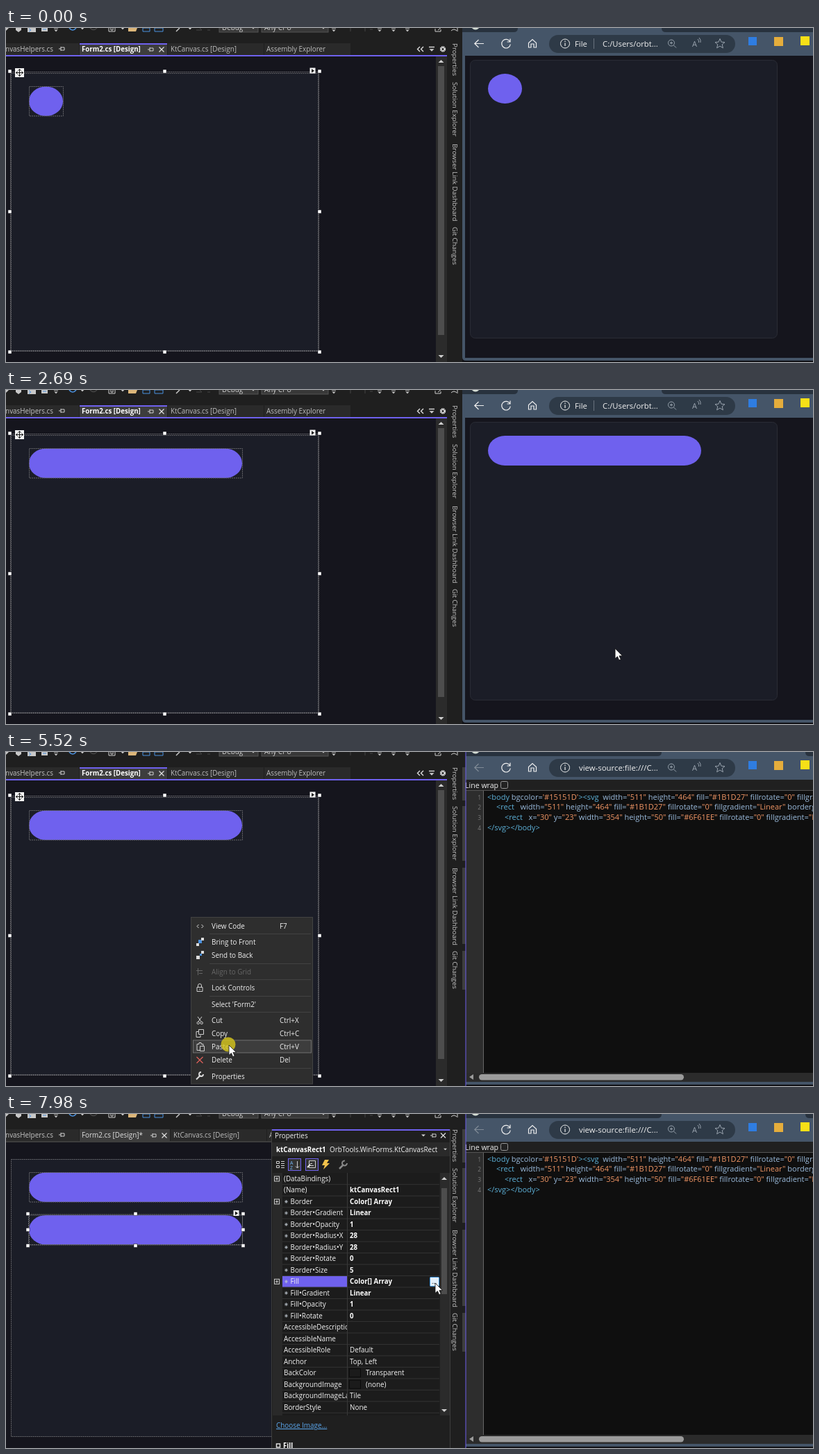
An HTML page that plays this animation: 1162 px wide and 482 px high, repeating every 8 s.

```html
<!DOCTYPE html>
<html lang="en">
<head>
<meta charset="utf-8">
<title>Form designer and browser</title>
<style>
html, body { margin: 0; width: 100%; height: 100%; overflow: hidden; background: #15151d; }
svg { display: block; width: 100%; height: 100%; }
text { font-family: "Open Sans", "Noto Sans", sans-serif; white-space: pre; }
</style>
</head>
<body>
<svg id="stage" viewBox="0 0 1162 482" xmlns="http://www.w3.org/2000/svg"></svg>
<script>
const LOOP = 8000, PURPLE = '#6f61ee', BAR = '#1f1f1f', BLUE = '#455568';
const stage = document.getElementById('stage');

const esc = s => s.replace(/&/g, '&amp;').replace(/</g, '&lt;').replace(/>/g, '&gt;');
const rect = (x, y, w, h, fill, more = '') =>
  `<rect x="${x}" y="${y}" width="${w}" height="${h}" fill="${fill}" ${more}/>`;
const line = (d, color = '#d0d0d0', w = 1, more = '') =>
  `<path d="${d}" fill="none" stroke="${color}" stroke-width="${w}" ${more}/>`;
const fill = (d, color = '#d0d0d0') => `<path d="${d}" fill="${color}"/>`;
const text = (x, y, s, color = '#d0d0d0', size = 9.9, more = '') =>
  `<text x="${x}" y="${y}" fill="${color}" font-size="${size}" ${more}>${esc(s)}</text>`;
const bold = (x, y, s, color = '#fff', size = 9.7, more = '') => text(x, y, s, color, size, `font-weight="700" ${more}`);
const group = (id, body, more = '') => `<g id="${id}" ${more}>${body}</g>`;
const dashed = (x, y, w, h, color = '#66666b', more = '') =>
  rect(x, y, w, h, 'none', `stroke="${color}" stroke-dasharray="2 1" ${more}`);
const pin = (x, y) => line(`M${x - 4} ${y}h3m0-3v6m0-5h5v4h-5`);
const cross = (x, y, r = 3.5, color = '#e0e0e0', w = 1.2) =>
  line(`M${x - r} ${y - r}l${2 * r} ${2 * r}m0 ${-2 * r}l${-2 * r} ${2 * r}`, color, w);
const caret = (x, y, r = 3.5, dir = 1) => fill(`M${x - r} ${y - dir * r / 2}h${2 * r}l${-r} ${dir * r}z`);

function pill(id, x, y) {
  return group(id,
    rect(x, y, 307, 42.5, PURPLE, 'rx="24.3" ry="21.2" class="shape"') +
    dashed(x + .5, y, 307, 42.5, '#66666b', 'class="shape"'));
}

// Dashed frame, eight handles and the small action button.
function selection(x, y, w, h) {
  let s = dashed(x + 1, y + 1, w - 2, h - 2, '#6c6c72');
  for (const i of [0, .5, 1]) for (const j of [0, .5, 1]) {
    if (i === .5 && j === .5) continue;
    s += rect(x + w * i - 2.5, y + h * j - 2.5, 5, 5, '#fff', 'stroke="#15151d" stroke-width=".5"');
  }
  return s + rect(x + w - 14, y - 5, 8, 8, '#f2f2f2') + fill(`M${x + w - 11.5} ${y - 3.5}l4 2.7l-4 2.7z`, '#111');
}

function toolbar() {
  let s = rect(0, 0, 662, 22, BAR);
  s += fill('M0 0h4l-4 4zM14 0h8v3l-4 3l-4-3zM31 0h12v6h-12zM51 0h9v5h-9z', '#c8c8c8');
  s += line('M33 1l3 2l-3 2M53 2h5M197 0h10v5h-10zM214 0h12v5h-12z', '#4b92e0');
  s += line('M91 0q5 6 10 0', '#4b92e0', 1.6) + line('M121 0q5 5 10 0', '#484848', 1.2);
  s += line('M148 0v5h9v-5M151 0v3h3v-3') + fill('M176 0h13l-2 5h-11z', '#dcb67a');
  s += line('M250 0l-5 5', '#c8c8c8', 1.5) + line('M274 3h8l-3-3M290 3h4', '#444');
  for (const x of [72, 472, 538, 558, 578]) s += line(`M${x - 3} 1h6`, '#aaa') + caret(x, 4, 2.5);
  for (const x of [110, 168, 265]) s += caret(x, 1, 2.5);
  s += line('M496 0v5M517 0v5M524 2h4', '#444');
  for (const [x, w, t] of [[307, 56, 'Debug'], [368, 96, 'Any CPU']])
    s += rect(x, -9, w, 15, '#383838', 'stroke="#555"') + text(x + 4, 3, t) + caret(x + w - 7, 0, 3);
  return s + line('M618 1v4h8v-3M622 3l5-4') + line('M641 4q4-4 8 0M650 0v5');
}

function tabs() {
  const right =
    rect(233, 22, 263, 17, '#2a2a2a') + line('M371.5 22v17', BAR) +
    text(237, 34, 'KtCanvas.cs [Design]', '#bdbdbd') + text(375, 34, 'Assembly Explorer', '#bdbdbd');
  return rect(0, 22, 635, 19, BAR) + rect(0, 22, 105, 17, '#2a2a2a') +
    text(68, 34, 'CanvasHelpers.cs', '#c4c4c4', 9.9, 'text-anchor="end"') + pin(80, 30) +
    group('tabsRight', right) +
    rect(106, 22, 126, 18, '#3d3d3d', 'id="tabBack"') + rect(106, 22, 126, 2, PURPLE, 'id="tabTop"') +
    bold(109, 34, '', '#fff', 9.7, 'id="tabBold"') + text(109, 34, '', '#e0e0e0', 9.9, 'id="tabPlain"') +
    group('tabIcons', pin(208, 31) + cross(224, 31)) +
    rect(0, 39, 635, 2, PURPLE, 'id="tabLine"') +
    rect(583, 22, 52, 17, BAR) +
    line('M596 27l-3.5 3.5l3.5 3.5M601 27l-3.5 3.5l3.5 3.5', '#ddd', 1.4) +
    line('M609 27.5h8', '#ddd', 1.4) + caret(613, 32) +
    `<circle cx="629" cy="30.5" r="3" fill="none" stroke="#ddd" stroke-width="2.4" stroke-dasharray="1.8 .55"/>` +
    `<circle cx="629" cy="30.5" r="2" fill="none" stroke="#ddd"/>`;
}

const blocks = [['Properties', 22, 48], ['Solution Explorer', 78, 79], ['Browser Link Dashboard', 167, 110], ['Git Changes', 287, 56]];

const scrollbar = () => rect(619, 41, 16, 441, '#2b2b2b') + rect(622, 55, 9, 388, '#4d4d4d') +
  caret(626.5, 48, 4, -1) + caret(626.5, 474, 4);

const sidebar = () => rect(640, 22, 22, 460, BAR) +
  blocks.map(([t, y]) => text(0, 0, t, '#c4c4c4', 9.8, `transform="translate(643 ${y}) rotate(90)"`)).join('');

function designer() {
  const move = rect(13, 58, 13, 13, '#f2f2f2') +
    line('M19.5 59.5v10M14.5 64.5h10M17.5 61.5l2-2l2 2M17.5 67.5l2 2l2-2M16.5 62.5l-2 2l2 2M22.5 62.5l2 2l-2 2', '#111');
  return rect(0, 41, 619, 441, '#15151d') + rect(7.5, 65, 442, 401, '#1b1d27') + dashed(7.5, 65.5, 442, 400) +
    pill('pillA', 33, 84.5) + pill('pillB', 0, 0) +
    group('selForm', selection(5.5, 62.5, 446, 405) + move) +
    group('selA', '') + group('selB', selection(-1.5, -2, 310, 46));
}

function contextMenu() {
  const items = [[251, 'View Code', 'F7'], [274, 'Bring to Front'], [293.5, 'Send to Back'], [317, 'Align to Grid'],
    [340, 'Lock Controls'], [364, "Select 'Form2'"], [387, 'Cut', 'Ctrl+X'], [406, 'Copy', 'Ctrl+C'],
    [425, 'Paste', 'Ctrl+V'], [444, 'Delete', 'Del'], [468, 'Properties']];
  let s = rect(266.5, 238.5, 175, 240.5, '#2e2e2e', 'stroke="#424242"') +
    rect(269.5, 416, 170, 18, '#3d3d3d', 'id="hover" stroke="#707070"');
  for (const y of [262, 305, 328, 352, 375, 456]) s += line(`M293 ${y}.5h146`, '#424242');
  for (const [y, label, key] of items) {
    s += text(296, y + 3.5, label, label.startsWith('Align') ? '#666' : '#f0f0f0');
    if (key) s += text(394, y + 3.5, key, '#f0f0f0');
  }
  s += line('M277.5 249l-2.5 2.5l2.5 2.5M281.5 249l2.5 2.5l-2.5 2.5', '#ddd');
  s += rect(274, 276, 4, 4, '#ddd') + rect(277, 271, 5, 5, '#4b92e0') + rect(281, 268, 4, 4, '#ddd');
  s += rect(274, 294, 5, 5, '#ddd') + rect(279, 291, 3, 3, '#4b92e0') + rect(281, 287, 4, 4, '#ddd');
  s += line('M276.5 312v10M274 315.5h9M278 319.5h5', '#666');
  s += line('M275 339.5h8v6h-8zM276.5 339.5v-2.5a2.5 2.5 0 0 1 5 0v2.5M279 341.5v2');
  s += line('M276 382l5 7M282 382l-5 7') + line('M275 391a1.7 1.7 0 1 0 3.4 0a1.7 1.7 0 1 0-3.4 0m5 0a1.7 1.7 0 1 0 3.4 0a1.7 1.7 0 1 0-3.4 0');
  s += line('M277.5 400.5h7v7h-7zM277 403.5h-3v8h6v-3');
  s += line('M275 421.5h3v-2h3v2h3v3M275 421.5v9h4M279.5 424.5h6v7h-6z');
  s += cross(279, 444.5, 4.5, '#e0605a') + line('M274 472.5l6-6', '#ddd', 2) + line('M284 465a3 3 0 1 1-3-3', '#ddd', 1.8);
  return s;
}

function properties() {
  const rows = [['+(DataBindings)'], ['(Name)', 'ktCanvasRect1'], ['+*Border', 'Color[] Array'], ['*Border•Gradient', 'Linear'],
    ['*Border•Opacity', '1'], ['*Border•Radius•X', '28'], ['*Border•Radius•Y', '28'], ['*Border•Rotate', '0'], ['*Border•Size', '5'],
    ['+*Fill', 'Color[] Array'], ['*Fill•Gradient', 'Linear'], ['*Fill•Opacity', '1'], ['*Fill•Rotate', '0'],
    ['AccessibleDescription'], ['AccessibleName'], ['AccessibleRole', 'Default'], ['Anchor', 'Top, Left'],
    ['BackColor', '#Transparent'], ['BackgroundImage', '#(none)'], ['BackgroundImageLayout', 'Tile'], ['BorderStyle', 'None']];
  let s = rect(382, 22, 258, 460, BAR) + rect(382, 22, 258, 2, PURPLE) + rect(382, 22, 1, 460, '#3d3d3d') + rect(639, 22, 1, 460, '#3d3d3d');
  s += text(387, 35, 'Properties', '#f0f0f0') + caret(601, 31, 3) + pin(615, 31) + cross(629.5, 31);
  s += rect(383, 41, 256, 20, '#2a2a2a') + bold(389, 54.5, 'ktCanvasRect1') + text(466, 54.5, 'OrbTools.WinForms.KtCanvasRect', '#f0f0f0') + caret(632.5, 51, 2.5);
  s += rect(406.5, 64.5, 18, 17, '#333', `stroke="${PURPLE}"`) + rect(431.5, 64.5, 18, 17, '#333', `stroke="${PURPLE}"`);
  s += line('M389.5 68.5h4v3h-4zM389.5 74.5h4v3h-4zM396 68.5h5M396 71.5h5M396 74.5h5M396 77.5h5');
  s += text(409, 73, 'A', '#75b8f5', 7) + text(409, 80, 'Z', '#75b8f5', 7) + line('M419.5 68v10M417 75.5l2.5 2.5l2.5-2.5');
  s += line('M436.5 67.5h9v10h-9zM438 71.5h3M438 74.5h5') + line('M434 77l4-4', '#eee', 2);
  s += fill('M459 66h6l-3 5h4l-9 9l2-6h-4z', '#f3c24b') + line('M480 79l6-6', '#888', 2.5) + line('M491 71a3.5 3.5 0 1 1-3-3.5', '#888', 2);
  s += rect(384, 85, 240, 350, '#1c1c1c') + rect(384, 85, 14, 350, '#292929');
  s += rect(398, 233.5, 93.5, 16.5, PURPLE, 'id="rowMark"');
  let names = '';
  rows.forEach(([name, value = ''], i) => {
    const y = 93.5 + i * 16.48;
    s += line(`M398 ${y + 8.2}h226`, '#333');
    if (name[0] === '+') {
      s += rect(386.5, y - 3.5, 7, 7, 'none', 'stroke="#ccc"') + line(`M388 ${y}h4M390 ${y - 2}v4`);
      name = name.slice(1);
    }
    const own = name[0] === '*';
    if (own) {
      s += line(`M401 ${y}h5M403.5 ${y - 2.5}v5M401.7 ${y - 1.8}l3.6 3.6m0-3.6l-3.6 3.6`, '#bfc7d0', .7);
      name = name.slice(1);
    }
    names += text(own ? 409.5 : 400, y + 3.5, name, '#f4f4f4');
    if (value[0] === '#') s += rect(494.5, y - 6, 16, 12, '#1b1b1b', 'stroke="#0a0a0a"') + text(518, y + 3.5, value.slice(1), '#f4f4f4');
    else s += i < 13 ? bold(495, y + 3.5, value) : text(495, y + 3.5, value, '#f4f4f4');
  });
  s += `<g clip-path="url(#nameCol)">${names}</g>` + line('M491.5 85v350', '#383838');
  s += group('more', rect(610.5, 235.5, 13, 13, '#e5f1fb', 'stroke="#3d93dc" rx="1"') + text(613, 245, '...', '#111', 9));
  s += rect(625, 85, 14, 350, '#2b2b2b') + rect(627, 107, 8, 153, '#4d4d4d') + caret(631, 93, 4, -1) + caret(631, 428, 4);
  s += rect(383, 435, 256, 47, BAR) + text(389, 453, 'Choose Image...', '#5ba7ee', 9.9, 'text-decoration="underline"');
  return s + rect(389.5, 476, 5, 5, 'none', 'stroke="#ddd" stroke-width="1.5"') + bold(399, 482, 'Fill');
}

function sourceLine(x, y, s) {
  const spans = s.replace(/(<\/?\w+>?|>)|("[^"]*"|'[^']*')|[^<>"']+/g, (m, tag, value) =>
    `<tspan fill="${tag ? '#5db0d7' : value ? '#f29766' : '#9bbbdc'}">${esc(m)}</tspan>`);
  return `<text x="${x}" y="${y}" font-size="11">${spans}</text>`;
}

function sourcePage() {
  const size = 'width="511" height="464" fill="#1B1D27" fillrotate="0" fillgradient="Linear"';
  const code = [[693, `<body bgcolor='#15151D'><svg  ${size}`], [706, `<rect   ${size} bordergradient="Linear"`],
    [718, '<rect   x="30" y="23" width="354" height="50" fill="#6F61EE" fillrotate="0" fillgradient="Linear"'], [693, '</svg></body>']];
  let s = rect(661, 40, 501, 436, '#0f0f0f') + rect(661, 40, 501, 16, '#202020') + line('M661 55.5h501', '#555');
  s += rect(661, 56, 26, 407, '#2d2d2d') + line('M687.5 56v407', '#666');
  s += text(661, 52, 'Line wrap', '#f0f0f0', 10.6) + rect(712.5, 42.5, 10, 10, '#222', 'stroke="#999" rx="2"');
  code.forEach(([x, t], i) => {
    const y = 68.5 + i * 14.8;
    s += sourceLine(x, y, t) + text(684, y, String(i + 1), '#777', 8.5, 'text-anchor="end"');
  });
  return s + rect(661, 463, 501, 13, '#2b2b2b') + rect(681, 465, 295, 8.5, '#9b9b9b', 'rx="4.2"') + fill('M667 469l6-4v8z', '#9b9b9b');
}

function browser() {
  let s = rect(657, 0, 505, 482, '#111116') + `<path d="M657 0h505v480h-500q-5 0-5-5z" fill="${BLUE}"/>`;
  s += rect(657, 0, 505, 6, '#28323e') + `<circle cx="676" cy="-4" r="6.5" fill="#d5ded5"/>`;
  s += group('openTab', fill('M731 6q6 0 6-6h207q0 6 6 6z', BLUE));
  s += rect(703, 10, 34, 25, '#5d6977', 'id="reloadHover" rx="4"');
  s += group('back', line('M688 22.5h-13M680.5 17l-5.7 5.5l5.7 5.5', '#f0f0f0', 1.2));
  s += group('reload', line('M725.5 19.5a6.3 6.3 0 1 0 .8 4M726 15.5v4.5h-4.5', '#f0f0f0', 1.2)) + group('stop', cross(720, 22.5, 5, '#f0f0f0', 1.2));
  s += line('M752.5 28v-6.5l5.5-5l5.5 5v6.5h-3.5v-5h-4v5z', '#f0f0f0', 1.2);
  s += rect(782, 10, 268, 26, '#2e3a47', 'rx="13"');
  s += `<circle cx="805" cy="22.5" r="6.5" fill="none" stroke="#eee"/>` + line('M805 21.5v4.5M805 18.5v1.5', '#eee', 1.2);
  s += group('urlFile', text(819, 27, 'File', '#f0f0f0', 11.3) + line('M846.5 15v15', '#69737f') + text(859, 27, 'C:/Users/orbt...', '#f0f0f0', 11.3));
  s += group('urlSource', text(825, 27, 'view-source:file:///C...', '#f0f0f0', 11.4));
  s += `<circle cx="958" cy="21.5" r="4.5" fill="none" stroke="#98a2ad"/>` + line('M961.5 25l3.5 3.5M956 21.5h4M958 19.5v4', '#98a2ad');
  s += text(988, 27, 'A', '#98a2ad', 11) + line('M996 16q2 2 1.5 5M998 14q3 3 2 7', '#98a2ad');
  s += line('M1028 15.5l2 4.7l5 .4l-3.8 3.2l1.2 5l-4.4-2.7l-4.4 2.7l1.2-5l-3.8-3.2l5-.4z', '#98a2ad');
  s += rect(1069, 13, 12, 12, '#2f7de1') + rect(1106, 13, 13, 13, '#e5ad3c') + rect(1144, 12, 13, 13, '#f7e017');
  const page = rect(661, 40, 501, 436, '#15151d') + rect(668.5, 46.5, 442, 401, '#1b1d27', 'rx="7" stroke="#2a2c35"') +
    rect(694, 66, 49, 43, PURPLE, 'id="webShape" rx="24.3" ry="21.5"');
  return s + group('page', page) + group('source', sourcePage());
}

stage.innerHTML = '<defs><clipPath id="nameCol"><path d="M384 85h107v350h-107z"/></clipPath></defs>' +
  designer() + toolbar() + tabs() + scrollbar() + rect(635, 22, 5, 460, BAR) +
  group('menu', contextMenu()) + group('panel', properties()) + sidebar() + browser() +
  group('edge', rect(657, 0, 5, 482, BAR) + blocks.map(([, y, h]) => rect(657, y, 5, h, '#3d3d3d')).join('') + rect(661.5, 0, 1, 482, PURPLE)) +
  group('cursor', '<circle id="halo" cx="-1" cy="-1" r="10.5" fill="#d8c81c" opacity=".8"/>' +
    '<path d="M0 0v14.5l3.4-3l2.3 5.2l2.5-1.1l-2.3-5h4.6z" fill="#fff" stroke="#111" stroke-width=".8"/>');

const el = {};
stage.querySelectorAll('[id]').forEach(e => el[e.id] = e);
const show = (id, on) => el[id].setAttribute('display', on ? 'inline' : 'none');
const place = (id, x, y) => el[id].setAttribute('transform', `translate(${x} ${y})`);
const within = (t, a, b) => t >= a && t < b;

// Pointer stops: time, x, y.
const stops = [[80, 688, 484], [430, 360, 260], [690, 60, 108], [860, 82, 106], [920, 82, 106], [1400, 340, 106], [1480, 340, 106],
  [1600, 515, 170], [1730, 295, 165], [1790, 295, 165], [2040, 722, 23], [2160, 722, 23], [2500, 860, 260], [2850, 890, 459],
  [3400, 890, 459], [4010, 248, 115], [4260, 248, 115], [4500, 290, 285], [4620, 290, 285], [4780, 266, 239], [4990, 266, 239],
  [5390, 321, 423], [5600, 321, 423], [5800, 277, 239], [5850, 277, 239], [6110, 230, 172.5], [6280, 230, 172.5], [6600, 690, 60],
  [6680, 648, 45], [6880, 648, 45], [7380, 450, 243], [7560, 450, 243], [7900, 618, 244], [8000, 618, 244]];
const clicks = [690, 1740, 2040, 2860, 4020, 4220, 4540, 4780, 4920, 5470, 6640, 7480];

function pointer(t) {
  const i = Math.max(1, stops.findIndex(s => s[0] > t));
  const [a, b] = [stops[i - 1], stops[i]];
  const u = Math.min(1, Math.max(0, (t - a[0]) / (b[0] - a[0])));
  const k = u * u * (3 - 2 * u);
  return [a[1] + (b[1] - a[1]) * k, a[2] + (b[2] - a[2]) * k];
}

let selWidth;
function draw(t) {
  const [px, py] = pointer(t);
  const dirty = within(t, 950, 1950) || t >= 5570;
  const focused = t >= 7480;
  const viewing = t >= 2960, loading = within(t, 2960, 3400);
  const ideActive = within(t, 690, 2040) || t >= 4020;

  place('cursor', px, py);
  show('cursor', t >= 80 && !within(t, 6120, 6290));
  show('halo', clicks.some(c => within(t, c, c + 100)) || within(t, 900, 1420));

  // Left window
  const w = t < 920 ? 49 : t < 1400 ? px - 33 : 307;
  el.pillA.querySelectorAll('.shape').forEach(e => e.setAttribute('width', w));
  if (w !== selWidth) el.selA.innerHTML = selection(31.5, 82.5, w + 3, 46);
  selWidth = w;
  const bx = t < 5850 ? 80 : t < 6110 ? px - 197 : 33, by = t < 5850 ? 212.5 : t < 6110 ? py - 26.5 : 146;
  for (const id of ['pillB', 'selB']) {
    place(id, bx, by);
    show(id, t >= 5570);
  }
  show('selForm', t < 690 || within(t, 1740, 4020) || within(t, 4780, 5570));
  show('selA', within(t, 690, 1740) || within(t, 4020, 4780));

  for (const id of ['tabBold', 'tabPlain']) {
    el[id].textContent = 'Form2.cs [Design]' + (dirty ? '*' : '');
    show(id, (id === 'tabPlain') === focused);
  }
  place('tabsRight', dirty ? 4 : 0, 0);
  place('tabIcons', dirty ? 4 : 0, 0);
  for (const id of ['tabBack', 'tabTop']) el[id].setAttribute('width', dirty ? 130 : 126);
  show('tabTop', !focused);
  el.tabLine.setAttribute('fill', focused ? '#3d3d3d' : PURPLE);

  const onPill = within(t, 4260, 4600);
  show('menu', onPill || within(t, 4960, 5570));
  place('menu', onPill ? -17 : 0, onPill ? -123 : 0);
  const my = onPill ? py + 123 : py;
  const row = [251, 274, 293.5, 340, 364, 387, 406, 425, 444].find(y => Math.abs(my - y) < 9.5);
  show('hover', row !== undefined);
  if (row) el.hover.setAttribute('y', row - 9);

  const slide = Math.min(1, Math.max(0, (t - 6680) / 100));
  show('panel', slide > 0);
  place('panel', 258 * (1 - slide) ** 2, 0);
  show('rowMark', focused);
  show('more', focused);

  // Right window
  show('edge', ideActive);
  place('openTab', viewing ? 207 : 0, 0);
  show('reloadHover', within(t, 2000, 2230));
  show('reload', !loading);
  show('stop', loading);
  el.back.setAttribute('opacity', viewing ? .35 : 1);
  show('urlFile', !viewing);
  show('urlSource', viewing);
  show('page', !viewing);
  show('source', viewing && !loading);
  el.webShape.setAttribute('width', t < 2200 ? 49 : 307);
}

const start = performance.now();
function tick() {
  draw((performance.now() - start) % LOOP);
  requestAnimationFrame(tick);
}
tick();
</script>
</body>
</html>
```
